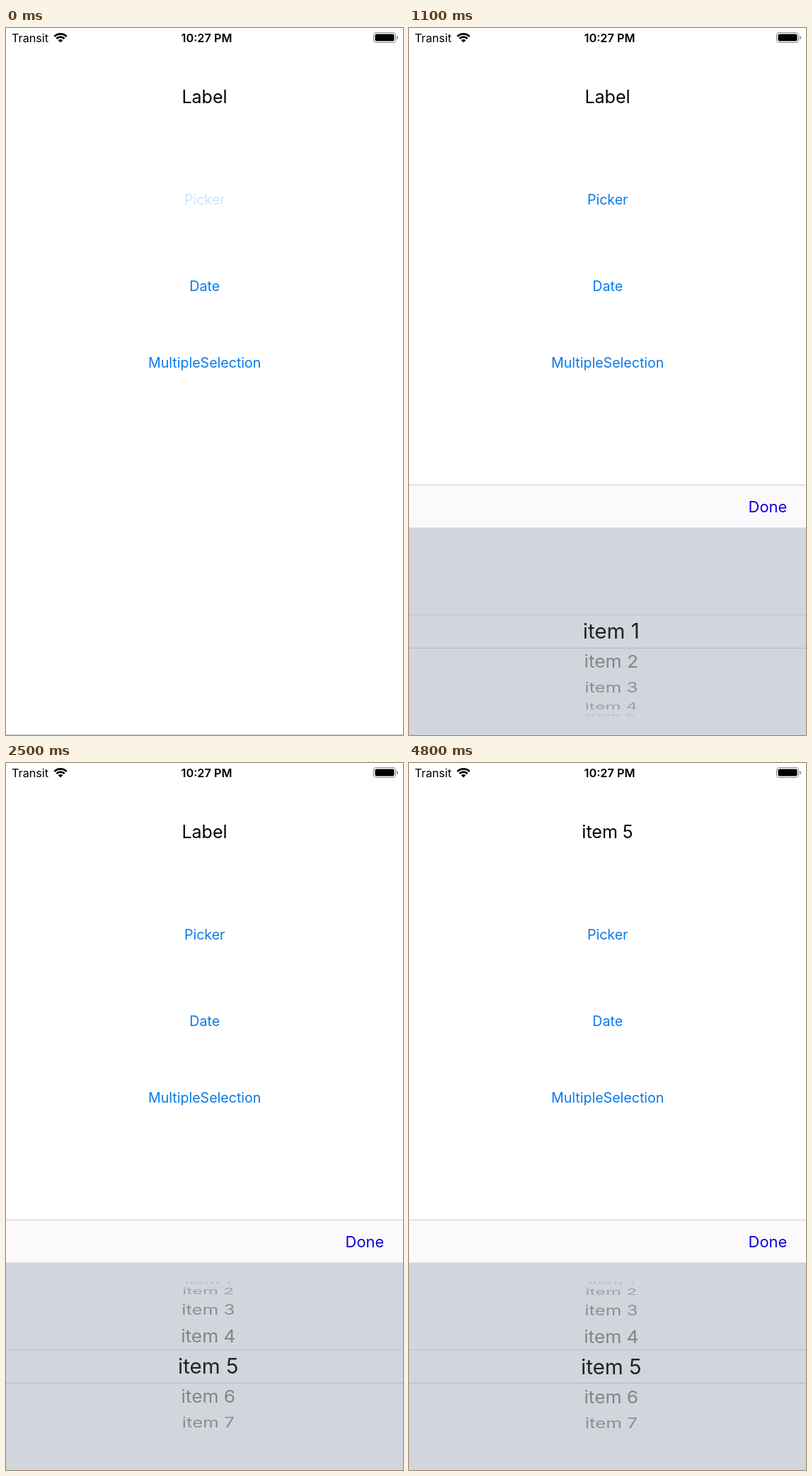
These frames come from a looping animation (561x997 px, 5100 ms). An HTML page with a canvas:

```html
<!DOCTYPE html>
<html lang="en">
<head>
<meta charset="utf-8">
<title>Picker demo</title>
<style>
  html, body { margin: 0; width: 100%; height: 100%; overflow: hidden; background: #fff; }
  canvas { display: block; width: 561px; height: 997px; }
</style>
</head>
<body>
<canvas id="stage" width="561" height="997"></canvas>
<script>
const ctx = document.getElementById('stage').getContext('2d');
const W = 561, H = 997, LOOP = 5100, STEP = 100;
const BLUE = '#087be9';
const PANEL_TOP = 644, PANEL_HIDDEN = 996;

// Wheel geometry, measured from the top of the panel
const ROWS = 7, ROW_ANGLE = 20.8 * Math.PI / 180, RADIUS = 119.6;
const WHEEL_X = 285.8, WHEEL_Y = 207.2, BAND_TOP = 183, BAND_BOTTOM = 230;
const CAP = 0.727;

// Time in ms, wheel position in rows
const SCROLL = [
  [1000, 0], [1100, 0.02], [1200, 0.45], [1600, 2.66], [1700, 2.83], [1800, 2.92], [1900, 2.945],
  [2200, 2.945], [2300, 3.2], [2500, 4.02], [2700, 4.45], [2800, 4.58], [2900, 4.66],
  [3300, 4.66], [3400, 5], [4400, 5], [4500, 4.82], [4600, 4.42], [4700, 4.1], [4800, 4]
];

const clamp = (v, lo = 0, hi = 1) => Math.min(hi, Math.max(lo, v));

function track(points, t) {
  if (t <= points[0][0]) return points[0][1];
  for (let i = 1; i < points.length; i++) {
    const [t0, v0] = points[i - 1], [t1, v1] = points[i];
    if (t <= t1) return v0 + (v1 - v0) * (t - t0) / (t1 - t0);
  }
  return points[points.length - 1][1];
}

// Critically damped spring, scaled to come to rest at 600 ms
function panelTop(t) {
  const spring = ms => (1 + ms * 0.0095) * Math.exp(-ms * 0.0095);
  const rest = spring(550);
  const left = (spring(clamp(t - 50, 0, 550)) - rest) / (1 - rest);
  return Math.round(PANEL_TOP + (PANEL_HIDDEN - PANEL_TOP) * left);
}

function text(str, x, y, size, color = '#000', align = 'center', weight = 400) {
  ctx.font = `${weight} ${size}px Inter, "Open Sans", sans-serif`;
  ctx.textAlign = align;
  ctx.fillStyle = color;
  ctx.fillText(str, x, y);
}

function rect(x, y, w, h, color) {
  ctx.fillStyle = color;
  ctx.fillRect(x, y, w, h);
}

function roundRect(x, y, w, h, r) {
  ctx.beginPath();
  ctx.roundRect(x, y, w, h, r);
}

function clipped(y0, y1, draw) {
  ctx.save();
  ctx.beginPath();
  ctx.rect(0, y0, W, y1 - y0);
  ctx.clip();
  draw();
  ctx.restore();
}

function wifi(x, y) {
  const from = -Math.PI * 0.75, to = -Math.PI * 0.25;
  ctx.strokeStyle = ctx.fillStyle = '#000';
  ctx.lineWidth = 2.7;
  for (const r of [12.2, 7.9]) {
    ctx.beginPath();
    ctx.arc(x, y, r, from, to);
    ctx.stroke();
  }
  ctx.beginPath();
  ctx.moveTo(x, y);
  ctx.arc(x, y, 4.7, from, to);
  ctx.fill();
}

function battery() {
  ctx.strokeStyle = '#8c8c8c';
  ctx.lineWidth = 1.2;
  roundRect(519.5, 6.5, 31, 14, 3.8);
  ctx.stroke();
  ctx.fillStyle = '#000';
  roundRect(521.5, 8.5, 27, 10, 2);
  ctx.fill();
  ctx.fillStyle = '#8c8c8c';
  roundRect(552, 11.2, 2, 4.8, [0, 2, 2, 0]);
  ctx.fill();
}

function statusBar() {
  text('Transit', 8, 20, 16.2, '#000', 'left');
  wifi(77, 20.6);
  text('10:27 PM', 283.5, 20, 16.3, '#000', 'center', 600);
  battery();
}

function wheelRows(top, scroll, selected) {
  const size = selected ? 29.6 : 26.4, zoom = selected ? 1.115 : 1;
  for (let i = 0; i < ROWS; i++) {
    const angle = (i - scroll) * ROW_ANGLE;
    if (Math.abs(angle) > Math.PI / 2) continue;
    const cos = Math.cos(angle);
    ctx.save();
    ctx.translate(WHEEL_X, top + WHEEL_Y + RADIUS * zoom * Math.sin(angle));
    ctx.scale(1 - 0.09 * (1 - cos), Math.max(cos, 0.28));
    ctx.globalAlpha = selected ? 1 : 0.43 * cos ** 0.6;
    text('item ' + (i + 1), 0, size * CAP / 2, size, selected ? '#222326' : '#101114');
    ctx.restore();
  }
}

function panel(top, scroll) {
  rect(0, top, W, H - top, '#d2d5dc');
  rect(0, top, W, 60.5, '#fbf9fc');
  rect(0, top, W, 1, '#cdcdd1');
  text('Done', 534.2, top + 39, 21.9, '#1200d8', 'right');

  const center = top + WHEEL_Y, bandTop = top + BAND_TOP, bandBottom = top + BAND_BOTTOM;
  clipped(center - 120, bandTop, () => wheelRows(top, scroll, false));
  clipped(bandBottom, center + 119.3, () => wheelRows(top, scroll, false));
  clipped(bandTop, bandBottom, () => wheelRows(top, scroll, true));
  rect(0, bandTop, W, 1, '#bcc1ca');
  rect(0, bandBottom, W, 1, '#b2b8c3');
}

function draw(t) {
  rect(0, 0, W, H, '#fff');
  statusBar();
  text(t < 3400 ? 'Label' : t < 4800 ? 'item 6' : 'item 5', 280.5, 106, 25);

  ctx.globalAlpha = 0.2 + 0.8 * clamp((t - 80) / 470);
  text('Picker', 280.7, 248.5, 19.6, BLUE);
  ctx.globalAlpha = 1;
  text('Date', 280.7, 370.5, 19.6, BLUE);
  text('MultipleSelection', 280.7, 478.7, 19.6, BLUE);

  panel(panelTop(t), track(SCROLL, t));
}

let start;
function tick(now) {
  start ??= now;
  const t = (now - start) % LOOP;
  draw(Math.floor(t / STEP) * STEP);
  requestAnimationFrame(tick);
}
draw(0);
requestAnimationFrame(tick);
</script>
</body>
</html>
```
